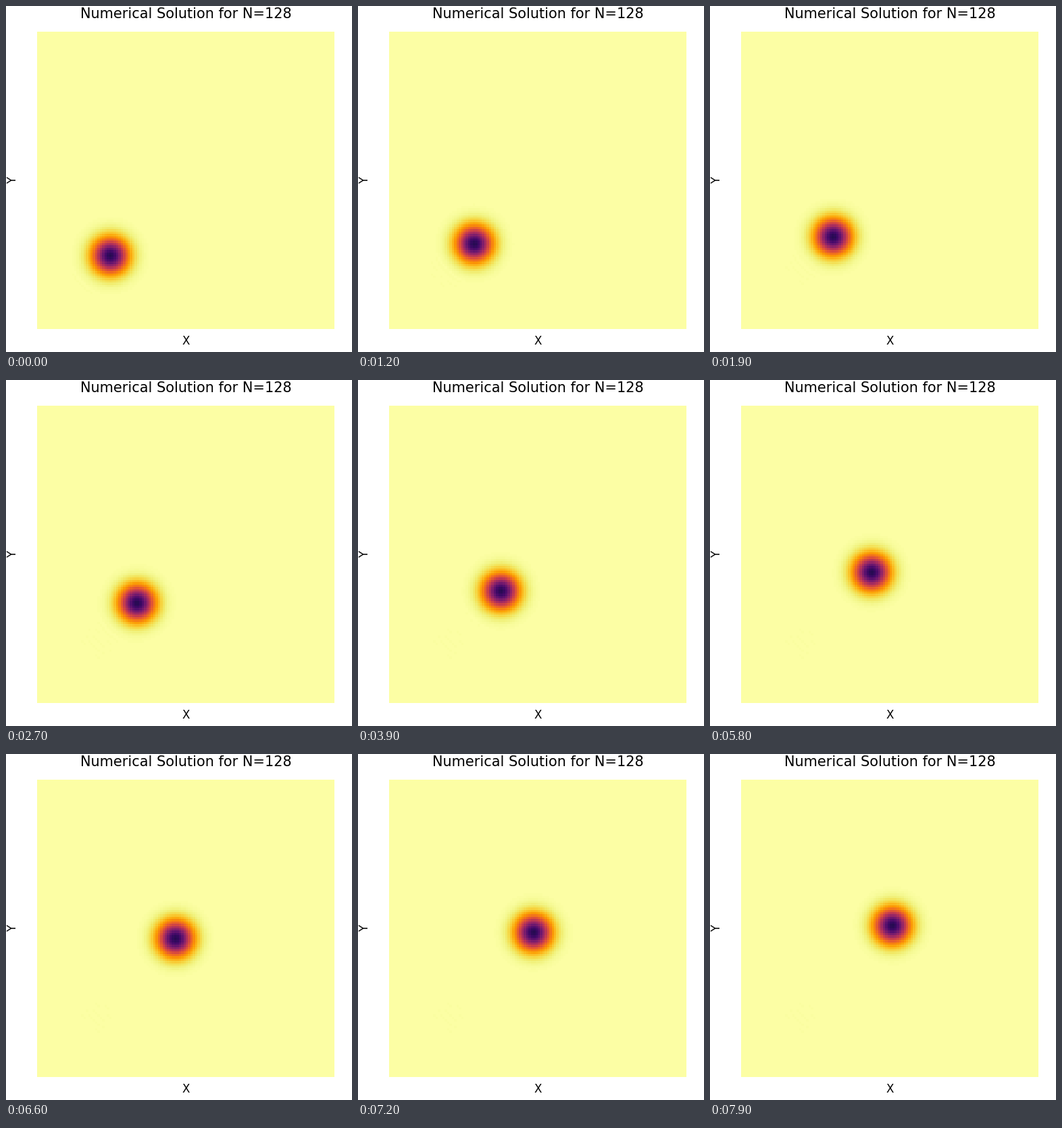
A matplotlib script for the animation above (8000 ms loop, 512x512 px).

```python
import numpy as np
import matplotlib.pyplot as plt
from matplotlib.animation import FuncAnimation

SIZE, DPI = 512, 100
N, FRAMES, INTERVAL = 128, 80, 100
LEFT, BOTTOM, SIDE = 46, 34, 440

START, STEP = 108.6, 1.46   # pulse centre on the diagonal, px
SIGMA, PEAK = 17.6, 0.86

plt.rcParams["font.family"] = "DejaVu Sans"

c = (np.arange(N) + 0.5) * SIDE / N
x, y = np.meshgrid(c, c)
along, across = (x + y) / np.sqrt(2), (x - y) / np.sqrt(2)

# Faint dispersive ripples left behind the pulse
ripple = np.sin(2 * np.pi * (along - across**2 / 160) / 9)
ripple *= np.exp(-((along - 125) / 55) ** 2 - (across / 45) ** 2)


def field(k):
    d = START + STEP * k
    pulse = PEAK * np.exp(-((x - d) ** 2 + (y - d) ** 2) / (2 * SIGMA**2))
    wake = np.clip((d * np.sqrt(2) - along - 45) / 15, 0, 1)
    return pulse + 0.005 * ripple * wake


fig = plt.figure(figsize=(SIZE / DPI, SIZE / DPI), dpi=DPI, facecolor="white")
ax = fig.add_axes([LEFT / SIZE, BOTTOM / SIZE, SIDE / SIZE, SIDE / SIZE])
ax.axis("off")
image = ax.imshow(field(0), cmap="inferno_r", vmin=0, vmax=1, origin="lower",
                  interpolation="nearest", aspect="auto")


def label(px, py, text, size, **kw):
    fig.text(px / SIZE, 1 - py / SIZE, text, fontsize=size, color="black",
             ha="center", va="baseline", **kw)


label(266.5, 18, "Numerical Solution for N=128", 15)
label(266.5, 501, "X", 12)
label(15, 258, "Y", 12, rotation=90, rotation_mode="anchor")


def update(k):
    image.set_data(field(k))
    return (image,)


anim = FuncAnimation(fig, update, frames=FRAMES, interval=INTERVAL,
                     repeat=True, repeat_delay=0)
plt.show()
```
